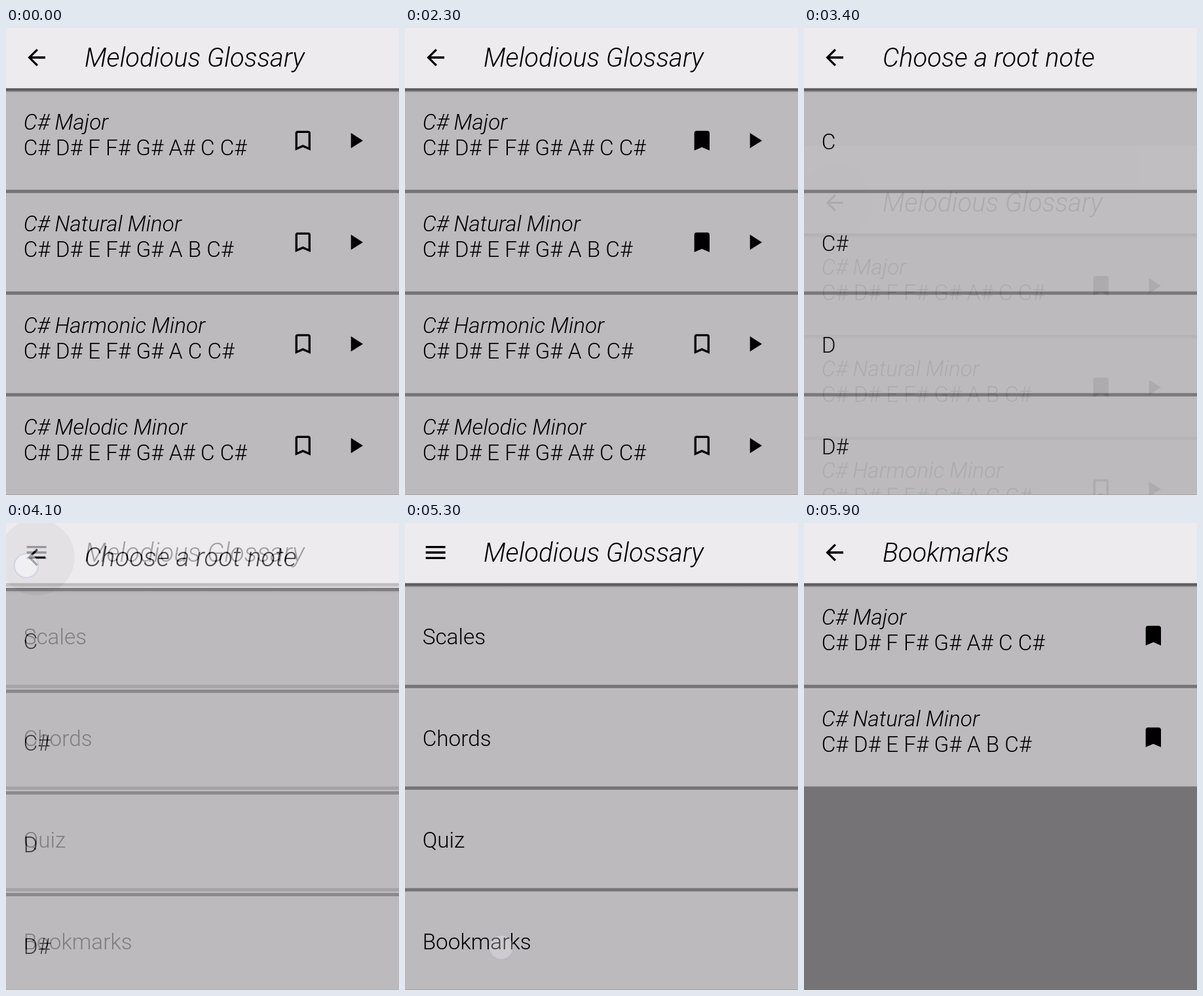
Animation, 600 px wide and 712 px high, one loop 7000 ms. Source, as an HTML page:

```html
<!DOCTYPE html>
<html lang="en">
<head>
<meta charset="utf-8">
<title>Scale list</title>
<style>
html, body { margin: 0; width: 100%; height: 100%; overflow: hidden; background: #757376; }
svg { display: block; width: 600px; height: 712px; }
text { font: 300 33.333px Roboto, sans-serif; white-space: pre; }
.title { font-size: 40px; }
.title, .name { font-style: italic; }
</style>
</head>
<body>
<svg id="stage" viewBox="0 0 600 712"></svg>
<script>
const LOOP = 7000, STEP = 100;
const DP = 5 / 3;                 // pixels per layout unit
const HEADER_END = 91.67, ROW_TOP = 96.67, ROW_PITCH = 155, ROW_HEIGHT = 150;
const SLIDE = 267, SLIDE_TIME = 300;
const APP = 'Melodious Glossary';

const ICONS = {
  back: 'M20 11H7.83l5.59-5.59L12 4l-8 8 8 8 1.41-1.41L7.83 13H20z',
  menu: 'M3 18h18v-2H3zM3 13h18v-2H3zM3 6v2h18V6z',
  mark: 'M17 3H7c-1.1 0-2 .9-2 2v16l7-3 7 3V5c0-1.1-.9-2-2-2z',
  markOpen: 'M17 3H7c-1.1 0-2 .9-2 2v16l7-3 7 3V5c0-1.1-.9-2-2-2zm0 15l-5-2.18L7 18V5h10z',
  play: 'M8 5v14l11-7z'
};

const icon = (name, x, y, id = '') =>
  `<path id="${id}" d="${ICONS[name]}" transform="translate(${x - 12 * DP} ${y - 12 * DP}) scale(${DP})"/>`;

const label = (text, x, y, cls = '') => `<text x="${x}" y="${y}" class="${cls}">${text}</text>`;

const page = (id, title, nav, rows) => `
  <g id="${id}">
    <rect y="${HEADER_END}" width="600" height="1000" fill="#757376"/>
    ${rows.map((row, i) => {
      const top = ROW_TOP + i * ROW_PITCH;
      return `<rect y="${top}" width="600" height="${ROW_HEIGHT}" fill="#bcbabd"/>` + row(top, i);
    }).join('')}
    <rect y="${HEADER_END}" width="600" height="9" fill="url(#shade)"/>
    <rect y="-42" width="600" height="${HEADER_END + 42}" fill="#edebee"/>
    <circle id="${id}Ripple" cx="46.67" cy="45" r="0" opacity=".06"/>
    ${icon(nav, 46.67, 45)}
    ${label(title, 120, 58.8, 'title')}
  </g>`;

const plainRow = text => top => label(text, 26.67, top + 88.2);

const scaleRow = (name, notes, buttons) => (top, i) =>
  label(name, 26.67, top + 58.3, 'name') +
  label(notes, 26.67, top + 97.3) +
  buttons(top + 75, i);

const listButtons = (y, i) =>
  icon('markOpen', 453.33, y, 'open' + i) +
  icon('mark', 453.33, y, 'full' + i) +
  icon('play', 533.33, y);
const savedButton = y => icon('mark', 533.33, y);

const SCALES = [
  ['C# Major', 'C# D# F F# G# A# C C#'],
  ['C# Natural Minor', 'C# D# E F# G# A B C#'],
  ['C# Harmonic Minor', 'C# D# E F# G# A C C#'],
  ['C# Melodic Minor', 'C# D# E F# G# A# C C#']
];
const scaleRows = (scales, buttons) => scales.map(s => scaleRow(...s, buttons));

document.getElementById('stage').innerHTML = `
  <defs>
    <linearGradient id="shade" x2="0" y2="1">
      <stop offset="0" stop-opacity=".28"/>
      <stop offset=".5" stop-opacity=".08"/>
      <stop offset="1" stop-opacity="0"/>
    </linearGradient>
  </defs>
  ${page('home', APP, 'menu', ['Scales', 'Chords', 'Quiz', 'Bookmarks'].map(plainRow))}
  ${page('roots', 'Choose a root note', 'back', ['C', 'C#', 'D', 'D#'].map(plainRow))}
  ${page('list', APP, 'back', scaleRows(SCALES, listButtons))}
  ${page('saved', 'Bookmarks', 'back', scaleRows(SCALES.slice(0, 2), savedButton))}
  <g id="touch">
    <circle r="18.5" fill="none" stroke="#8c8ab0" stroke-opacity=".35" stroke-width="1.2"/>
    <circle r="17.5" fill="#fff" fill-opacity=".62" stroke="#dcdcf8" stroke-opacity=".7" stroke-width="1.5"/>
  </g>`;

const el = id => document.getElementById(id);
const clamp = v => Math.min(1, Math.max(0, v));

function bezier(x1, y1, x2, y2) {
  const at = (a, b, s) => 3 * a * s * (1 - s) ** 2 + 3 * b * s * s * (1 - s) + s ** 3;
  return x => {
    let lo = 0, hi = 1;
    for (let i = 0; i < 24; i++) {
      const mid = (lo + hi) / 2;
      if (at(x1, x2, mid) < x) lo = mid; else hi = mid;
    }
    return at(y1, y2, (lo + hi) / 2);
  };
}
const easeIn = bezier(.42, 0, 1, 1);
const slideEase = bezier(.4, 0, .2, 1);

// Each tap: start, position, and its opacity at every step
const TAPS = [
  { start: 1100, x: 443, y: 182, levels: [1, 1, .5, .15] },
  { start: 1800, x: 442, y: 338, levels: [.8, 1, 1, .5, .15] },
  { start: 3000, x: 31, y: 65, levels: [.8, 1, .8, .3] },
  { start: 3900, x: 31, y: 65, levels: [.8, 1, .8, .3] },
  { start: 5100, x: 147, y: 647, levels: [.8, .8, .4, .12] }
];
const FILL_TIMES = [1200, 2000, Infinity, Infinity];

function showPage(id, amount) {
  const v = clamp(amount), node = el(id);
  node.style.display = v > 0 ? '' : 'none';
  node.setAttribute('opacity', v < 1 ? easeIn(v) : 1);
  node.setAttribute('transform', `translate(0 ${v < 1 ? SLIDE * (1 - slideEase(v)) : 0})`);
}

function ripple(id, t, start) {
  const grow = clamp((t - start) / 200);
  el(id + 'Ripple').setAttribute('r', t < start ? 0 : 20 + 38 * grow);
}

function render(t) {
  showPage('list', (3466 - t) / SLIDE_TIME);
  showPage('roots', (4337 - t) / SLIDE_TIME);
  showPage('saved', (t - 5350) / SLIDE_TIME);
  ripple('list', t, 3000);
  ripple('roots', t, 3900);

  FILL_TIMES.forEach((time, i) => {
    el('full' + i).style.display = t >= time ? '' : 'none';
    el('open' + i).style.display = t >= time ? 'none' : '';
  });

  const tap = TAPS.find(p => t >= p.start && t < p.start + p.levels.length * STEP);
  const touch = el('touch');
  touch.style.display = tap ? '' : 'none';
  if (tap) {
    touch.setAttribute('transform', `translate(${tap.x} ${tap.y})`);
    touch.setAttribute('opacity', tap.levels[(t - tap.start) / STEP]);
  }
}

const begin = performance.now();
function tick() {
  const t = (performance.now() - begin) % LOOP;
  render(Math.floor(t / STEP) * STEP);
  requestAnimationFrame(tick);
}
tick();
</script>
</body>
</html>
```
